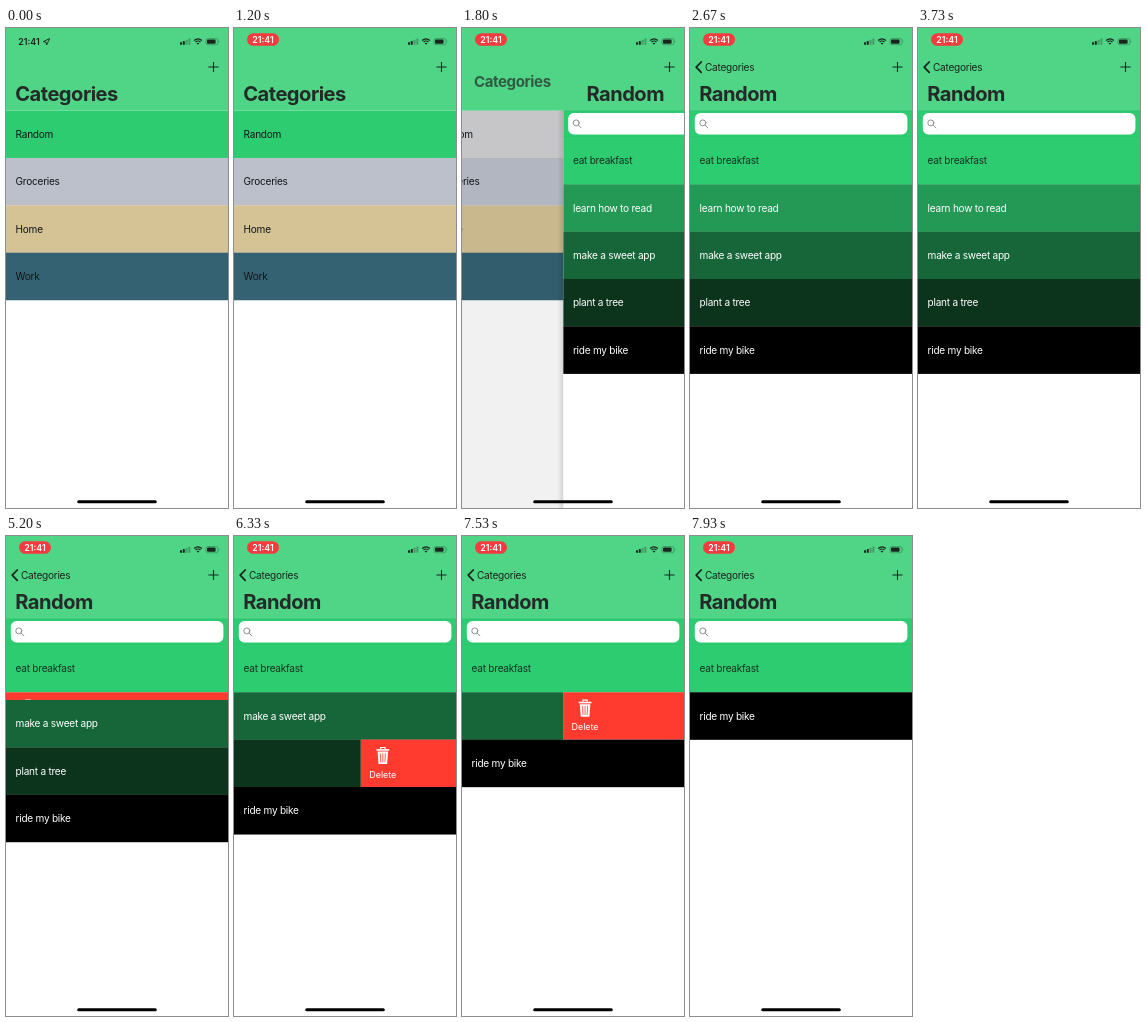
Write an HTML page that moves like this. It is 222 px wide and 480 px high and loops after 8 s.

```html
<!DOCTYPE html>
<html lang="en">
<head>
<meta charset="utf-8">
<title>Todo list</title>
<style>
  html, body { margin: 0; width: 100%; height: 100%; overflow: hidden; background: #fff; }
  svg { display: block; width: 100vw; height: 100vh; }
  text { font: 400 10.06px Inter, Roboto, sans-serif; letter-spacing: -.24px; white-space: pre; }
  .title { font-size: 20.1px; font-weight: 700; letter-spacing: -.5px; fill: #232a27; }
  .time { font-size: 8.8px; font-weight: 600; letter-spacing: 0; }
  .del { font-size: 9px; fill: #fff; letter-spacing: -.05px; }
</style>
</head>
<body>
<svg viewBox="0 0 222 480" xmlns="http://www.w3.org/2000/svg">
  <defs>
    <linearGradient id="edge">
      <stop offset="0" stop-color="#000" stop-opacity="0"/>
      <stop offset="1" stop-color="#000" stop-opacity=".12"/>
    </linearGradient>
    <g id="trash" fill="none" stroke="#fff">
      <path d="M-2.2 -6.4V-8H2.2V-6.4" stroke-width="1.1"/>
      <path d="M-6.4 -5.6H6.4" stroke-width="1.6"/>
      <path d="M-5.3 -3.9H5.3L4.3 8.6H-4.3Z" fill="#fff" stroke="none"/>
      <path d="M-2.5 -2.2L-2.1 6.8M0 -2.2V6.8M2.5 -2.2L2.1 6.8" stroke="#ff3b30" stroke-width=".8"/>
    </g>
  </defs>
  <rect width="222" height="480" fill="#fff"/>

  <g id="home">
    <g id="categories"></g>
    <rect id="dim" y="82" width="222" height="398" fill="#000020"/>
  </g>

  <g id="detail">
    <rect x="-6" y="82" width="6" height="398" fill="url(#edge)"/>
    <rect y="82" width="222" height="398" fill="#fff"/>
    <rect y="82" width="222" height="27.3" fill="#2ecc71"/>
    <path d="M0 82.9H222M0 108.9H222" stroke="#1f9d55" stroke-width=".5" opacity=".55"/>
    <rect x="4.8" y="85" width="212.6" height="21.4" rx="5.6" fill="#fff"/>
    <g fill="none" stroke="#85858a" stroke-width=".9" stroke-linecap="round">
      <circle cx="12.8" cy="94.9" r="3"/>
      <path d="M15.1 97.2L17.8 99.9"/>
    </g>
    <g id="items"></g>
  </g>

  <rect width="222" height="82.6" fill="#50d486"/>
  <g id="homeTitle"><text class="title">Categories</text></g>
  <g id="backTitle"><text fill="#17251d">Categories</text></g>
  <path id="chevron" d="M11.2 34L6.2 39.2L11.2 44.4" fill="none" stroke="#17251d" stroke-width="1.8" stroke-linecap="round" stroke-linejoin="round"/>
  <text id="detailTitle" class="title" y="73.4">Random</text>
  <path d="M202.4 39H212.6M207.5 33.9V44.1" stroke="#17251d" stroke-width="1.1"/>

  <g id="plainTime" fill="#17251d">
    <text class="time" x="12.3" y="17">21:41</text>
    <path d="M37.2 13.6L43.6 10.6L40.6 17L40 14.2Z" fill="none" stroke="#17251d" stroke-width=".9" stroke-linejoin="round"/>
  </g>
  <g id="pill">
    <rect x="13" y="5.2" width="32" height="12.6" rx="6.3" fill="#f53b3e"/>
    <text class="time" x="29" y="14.7" text-anchor="middle" fill="#fff">21:41</text>
  </g>
  <g fill="#17251d">
    <rect x="174" y="14.2" width="2" height="2.6" rx=".4"/>
    <rect x="176.8" y="13.1" width="2" height="3.7" rx=".4"/>
    <g opacity=".3">
      <rect x="179.6" y="11.8" width="2" height="5" rx=".4"/>
      <rect x="182.4" y="10.4" width="2" height="6.4" rx=".4"/>
    </g>
    <path d="M190.6 15.2Q192 14.1 193.4 15.2L192 16.8Z"/>
    <g fill="none" stroke="#17251d" stroke-width="1.1">
      <path d="M189.5 14Q192 11.9 194.5 14M188.1 12.5Q192 9.2 195.9 12.5"/>
      <rect x="200" y="10.6" width="12" height="6.2" rx="1.9" stroke-width=".6" opacity=".5"/>
    </g>
    <rect x="201" y="11.6" width="8.6" height="4.2" rx="1.1"/>
    <path d="M212.8 12.6Q213.8 13.6 212.8 14.8Z" opacity=".5"/>
  </g>
  <rect x="71.2" y="472.3" width="79.6" height="3" rx="1.5" fill="#000"/>
</svg>

<script>
const LOOP = 8000, W = 222, ROW = 47.36;
const PILL_AT = 430, TAP_AT = 1590, PUSH_AT = 1686, PUSH_MS = 500;
const $ = id => document.getElementById(id);

const categories = [
  ['Random', '#2ecc71'], ['Groceries', '#bcc0ca'],
  ['Home', '#d5c295'], ['Work', '#356272'],
];
// swipe: start, end of the drag, end of the collapse
const items = [
  { label: 'eat breakfast' },
  { label: 'learn how to read', swipe: [4500, 4980, 5350] },
  { label: 'make a sweet app', swipe: [7397, 7657, 7870] },
  { label: 'plant a tree', swipe: [6141, 6541, 6870] },
  { label: 'ride my bike' },
];

const clamp = v => Math.min(1, Math.max(0, v));
const span = (t, a, b) => clamp((t - a) / (b - a));
const mix = (a, b, k) => a + (b - a) * k;
const inOut = u => u < .5 ? 4 * u ** 3 : 1 - 4 * (1 - u) ** 3;
const out = (u, n) => 1 - (1 - u) ** n;
const move = (el, x, y = 0, s = 1) =>
  el.setAttribute('transform', `translate(${x.toFixed(2)} ${y.toFixed(2)}) scale(${s.toFixed(4)})`);
const fade = (el, v) => el.setAttribute('opacity', v);

// Each item is a step darker than the one above it
const shade = i => `rgb(${[46, 204, 113].map(c => Math.round(c * (1 - i / 4))).join()})`;

const rowMarkup = (label, bg, ink) =>
  `<rect width="${W}" height="${ROW + .2}" fill="${bg}"/><text x="9.6" y="27.3" fill="${ink}">${label}</text>`;

const deleteMarkup =
  `<rect x="${W}" width="${W}" height="${ROW}" fill="#ff3b30"/>
   <use href="#trash" x="${W + 22}" y="15.9"/>
   <text class="del" x="${W + 22}" y="37.9" text-anchor="middle">Delete</text>`;

$('categories').innerHTML = categories.map(([label, bg], i) =>
  `<g transform="translate(0 ${82.6 + i * ROW})">${rowMarkup(label, bg, '#12161a')}</g>`).join('');
$('items').innerHTML = items.map(({ label, swipe }, i) =>
  `<g>${rowMarkup(label, shade(i), i ? '#fff' : '#12301f')}${swipe ? deleteMarkup : ''}</g>`).join('');

const itemRows = [...$('items').children];
const tapped = $('categories').querySelector('rect');

function drawItems(t) {
  let y = 108.9;
  items.forEach(({ swipe }, i) => {
    let drag = 0, height = ROW;
    if (swipe) {
      const [start, full, end] = swipe;
      drag = W * inOut(span(t, start, full));
      height *= 1 - out(span(t, full, end), 2);
    }
    move(itemRows[i], -drag, y);
    itemRows[i].style.display = height > 0 ? '' : 'none';
    y += height;
  });
}

function drawPush(t) {
  const p = out(span(t, PUSH_AT, PUSH_AT + PUSH_MS), 3);
  const q = p ** 1.2;
  const late = clamp((p - .6) / .4);

  move($('home'), -.3 * W * p);
  fade($('dim'), .1 * p);
  move($('detail'), W * (1 - p));
  $('detail').style.display = p > 0 ? '' : 'none';

  // The large title shrinks into the back button
  const x = mix(9.2, 15, q), y = mix(73.4, 42.7, q), size = mix(1, .476, q);
  move($('homeTitle'), x, y, size);
  fade($('homeTitle'), (1 - p * p) * (1 - late));
  move($('backTitle'), x, y, size / .476);
  fade($('backTitle'), late);
  fade($('chevron'), late);
  move($('detailTitle'), 9.2 + W * (1 - q));
}

function draw(t) {
  $('plainTime').style.display = t < PILL_AT ? '' : 'none';
  $('pill').style.display = t < PILL_AT ? 'none' : '';
  tapped.setAttribute('fill', t < TAP_AT ? categories[0][1] : '#d1d1d4');
  drawPush(t);
  drawItems(t);
}

const began = performance.now();
function tick() {
  draw((performance.now() - began) % LOOP);
  requestAnimationFrame(tick);
}
tick();
</script>
</body>
</html>
```
